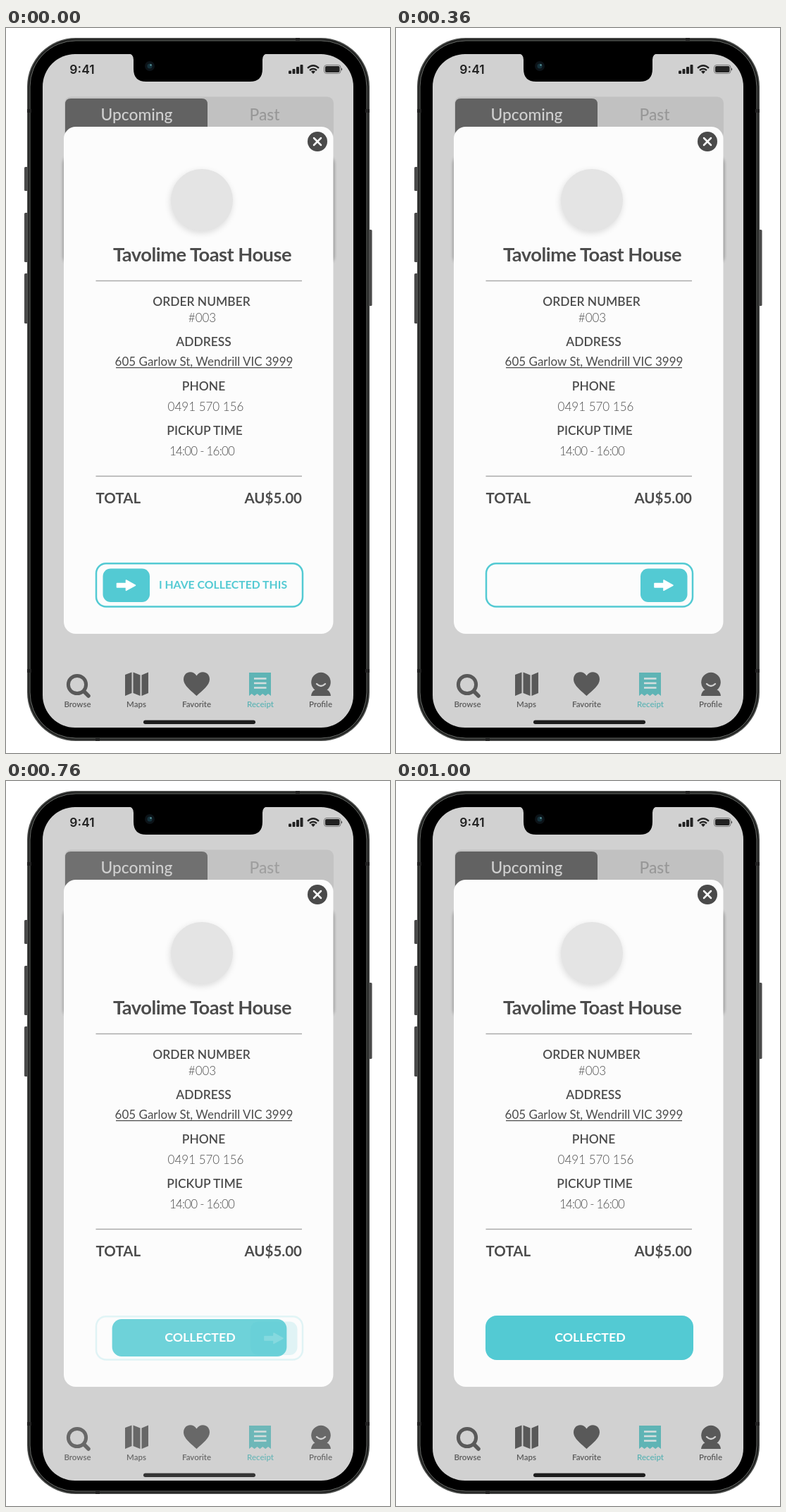
Animation of 545 by 1028 pixels, one loop 1.24 s. Source, as an HTML page:

```html
<!DOCTYPE html>
<html lang="en">
<head>
<meta charset="utf-8">
<title>Order receipt</title>
<style>
  html, body { margin: 0; width: 100%; height: 100%; overflow: hidden; background: #fff; }
  svg { display: block; width: 100%; height: 100%; }
  text { font-family: Lato, "Open Sans", sans-serif; fill: #4c4c4c; }
  .mid { text-anchor: middle; }
  .label { font-size: 17.4px; font-weight: 600; }
  .value { font-size: 17px; font-weight: 300; }
  .tab { font-size: 22.8px; font-weight: 500; }
  .total { font-size: 20.5px; font-weight: 700; }
  .nav { font-size: 11.5px; font-weight: 600; fill: #5a5a5a; }
  .clock { font: 600 17.5px Inter, sans-serif; fill: #222; }
</style>
</head>
<body>
<svg viewBox="0 0 545 1028" xmlns="http://www.w3.org/2000/svg">
  <defs>
    <filter id="soft" x="-30%" y="-30%" width="160%" height="160%"><feGaussianBlur stdDeviation="5"/></filter>
    <filter id="edge" x="-10%" y="-10%" width="120%" height="120%"><feGaussianBlur stdDeviation="2"/></filter>
  </defs>

  <!-- Phone body -->
  <g fill="#4a4a4a">
    <rect x="26" y="197" width="6" height="34" rx="1.5"/>
    <rect x="26" y="262" width="6" height="70" rx="1.5"/>
    <rect x="26" y="348" width="6" height="71" rx="1.5"/>
    <rect x="513" y="286" width="6.5" height="108" rx="1.5"/>
  </g>
  <rect x="30" y="14" width="486" height="997" rx="69" fill="#4d4f4d"/>
  <rect x="31.5" y="15.5" width="483" height="994" rx="67.5" fill="#1e1f1e"/>
  <rect x="34" y="18" width="478" height="989" rx="65" fill="#000" stroke="#6b6e6b" stroke-width="1"/>
  <g fill="#222">
    <rect x="30" y="115" width="6" height="5"/><rect x="510" y="115" width="6" height="5"/>
    <rect x="30" y="909" width="6" height="5"/><rect x="510" y="909" width="6" height="5"/>
    <rect x="411" y="14" width="6" height="4"/><rect x="127" y="1007" width="6" height="4"/>
  </g>
  <rect x="52" y="37" width="441" height="955" rx="46" fill="#d1d1d1"/>
  <path d="M172 36q9 0 9 9v13q0 18 18 18h147q18 0 18-18V45q0-9 9-9z"/>
  <circle cx="204" cy="54" r="7" fill="#0c1318"/>
  <circle cx="204" cy="54" r="3.6" fill="#16323c"/>
  <circle cx="205.5" cy="52.5" r="1.2" fill="#5b9aa0"/>

  <!-- Status bar -->
  <text class="clock mid" x="108" y="64.5">9:41</text>
  <g fill="#222">
    <rect x="401" y="60.5" width="4" height="4.5" rx="1"/>
    <rect x="406.5" y="58" width="4" height="7" rx="1"/>
    <rect x="412" y="55" width="4" height="10" rx="1"/>
    <rect x="417.5" y="52" width="4" height="13" rx="1"/>
    <rect x="453" y="54" width="20.5" height="9" rx="2"/>
    <path d="M476 56.5q2 2 0 4z"/>
    <path d="M436 65l-3-3.2q3-2.4 6 0z"/>
  </g>
  <g fill="none" stroke="#222">
    <path d="M428 56.8q8-7 16 0M431 60q5-4.2 10 0" stroke-width="2.3"/>
    <rect x="451.5" y="52.5" width="23.5" height="12" rx="3.5" stroke="#777"/>
  </g>

  <!-- Page behind the receipt -->
  <g id="page">
    <rect x="81" y="182" width="385" height="152" rx="10" opacity=".3" filter="url(#edge)"/>
    <rect x="83" y="97.5" width="382" height="60" rx="9" fill="#c1c1c1"/>
    <path d="M84 150v-42q0-8 8-8h186q8 0 8 8v42z" fill="#626262"/>
    <text class="tab mid" x="185.5" y="130.5" style="fill:#d0d0d0">Upcoming</text>
    <text class="tab mid" x="367" y="130.5" style="fill:#989898">Past</text>

    <g fill="#595959">
      <circle cx="101" cy="931" r="12.6" fill="none" stroke="#595959" stroke-width="5"/>
      <path d="M110.5 940.5l6.5 6.5" stroke="#595959" stroke-width="5.5" stroke-linecap="round"/>
      <path d="M169 917l9.5-3.5v29.5l-9.5 4zM180.5 913.5l10 4v29.5l-10-4zM192.500 917.500l9.500-4v29.500l-9.500 4z"/>
      <path d="M270.500 947C262 939 252 932 252 923.500C252 912 265.500 910 270.500 918.500C275.500 910 289 912 289 923.500C289 932 279 939 270.500 947z"/>
      <path d="M433 947q1-7 5.500-8.500a13.800 13.800 0 1 1 17 0q4.500 1.500 5.500 8.500z"/>
    </g>
    <path d="M441 930q6 6 12 0" fill="none" stroke="#d1d1d1" stroke-width="2.4" stroke-linecap="round"/>
    <path d="M345 914h31v33l-3.900-3-3.900 3-3.900-3-3.900 3-3.900-3-3.900 3-3.900-3-3.700 3z" fill="#5fb4b5"/>
    <path d="M352 922.500h17.500M352 929h17.500M352 935.500h17.500" stroke="#d5dede" stroke-width="2.600"/>
    <g class="mid">
      <text class="nav" x="101.500" y="962.500">Browse</text>
      <text class="nav" x="185" y="962.500">Maps</text>
      <text class="nav" x="270.500" y="962.500">Favorite</text>
      <text class="nav" x="361" y="962.500" style="fill:#5fb4b5">Receipt</text>
      <text class="nav" x="446.500" y="962.500">Profile</text>
    </g>
    <rect x="195" y="981.500" width="159" height="5.500" rx="2.750" fill="#1c1c1c"/>
  </g>

  <!-- Receipt -->
  <rect x="82" y="140" width="382.500" height="719" rx="17" fill="#fcfcfc"/>
  <circle cx="442" cy="161" r="14" fill="#4a4a4a"/>
  <path d="M437 156l10 10M447 156l-10 10" stroke="#fff" stroke-width="2.500" stroke-linecap="round"/>
  <circle cx="277" cy="247" r="44" opacity=".13" filter="url(#soft)"/>
  <circle cx="278" cy="244" r="44" fill="#e4e4e4"/>
  <g class="mid">
    <text x="278.500" y="331" font-size="27.300" font-weight="700" letter-spacing="-.5">Tavolime Toast House</text>
    <text class="label" x="277.500" y="394">ORDER NUMBER</text>
    <text class="value" x="278.500" y="416.500">#003</text>
    <text class="label" x="280.500" y="451">ADDRESS</text>
    <text x="281" y="479" font-size="17">605 Garlow St, Wendrill VIC 3999</text>
    <text class="label" x="280.500" y="514">PHONE</text>
    <text class="value" x="283.500" y="542.500">0491 570 156</text>
    <text class="label" x="282" y="577">PICKUP TIME</text>
    <text class="value" x="278" y="605.500" letter-spacing="-.8">14:00 - 16:00</text>
  </g>
  <path d="M156 481.700h250" stroke="#4c4c4c" stroke-width="1.200"/>
  <path d="M127.500 358.500h292.500M127.500 635.500h292.500" stroke="#aaa" stroke-width="1.400"/>
  <text class="total" x="127.500" y="674">TOTAL</text>
  <text class="total" x="420" y="674" text-anchor="end">AU$5.00</text>

  <!-- Collect control -->
  <g id="done">
    <rect id="pill" fill="#53cad3"/>
    <text class="mid" x="275.500" y="795" font-size="17.800" font-weight="700" style="fill:#fff">COLLECTED</text>
  </g>
  <g id="slider">
    <rect x="128" y="759.200" width="293" height="61.300" rx="14" fill="none" stroke="#53cad3" stroke-width="2.500"/>
    <text id="hint" class="mid" x="308" y="795" font-size="15.800" font-weight="700" style="fill:#53cad3">I HAVE COLLECTED THIS</text>
    <g id="knob">
      <rect x="137.500" y="766.500" width="66.500" height="47.500" rx="11" fill="#53cad3"/>
      <path d="M157.500 787.500h13v-4.500l13 7.200-13 7.200v-4.500h-13z" fill="#fff" stroke="#fff" stroke-width="1.600" stroke-linejoin="round"/>
    </g>
  </g>
</svg>
<script>
const LOOP = 1240, STEP = 40;
const el = id => document.getElementById(id);
const [page, done, pill, slider, hint, knob] =
  ["page", "done", "pill", "slider", "hint", "knob"].map(el);
const clamp = v => Math.min(1, Math.max(0, v));
const set = (node, attrs) => {
  for (const key in attrs) node.setAttribute(key, attrs[key]);
};

const inOut = u => u < .5 ? 2 * u * u : 1 - 2 * (1 - u) ** 2;
// Rises past 1 and comes back
const overshoot = u => u * (1.854 + .157 * u - 1.011 * u * u);

function draw(time) {
  const t = Math.floor(time % LOOP / STEP) * STEP;
  const slide = inOut(clamp(t / 360));
  const grow = overshoot(clamp((t - 560) / 400));
  const fade = clamp(grow);
  const w = 295 * grow, h = 63 * grow;

  set(knob, { transform: `translate(${209.5 * slide} 0)` });
  set(hint, { opacity: 1 - slide });
  set(slider, { opacity: 1 - fade });
  set(done, { opacity: fade });
  set(pill, { x: 274.5 - w / 2, y: 789.5 - h / 2, width: w, height: h, rx: 16 * grow });
  // The cross-dissolve thins the page halfway through each change
  const dip = t < 560 ? slide * (1 - slide) : fade * (1 - fade);
  set(page, { opacity: 1 - dip });
}

const start = performance.now();
function tick() {
  draw(performance.now() - start);
  requestAnimationFrame(tick);
}
draw(0);
requestAnimationFrame(tick);
</script>
</body>
</html>
```
